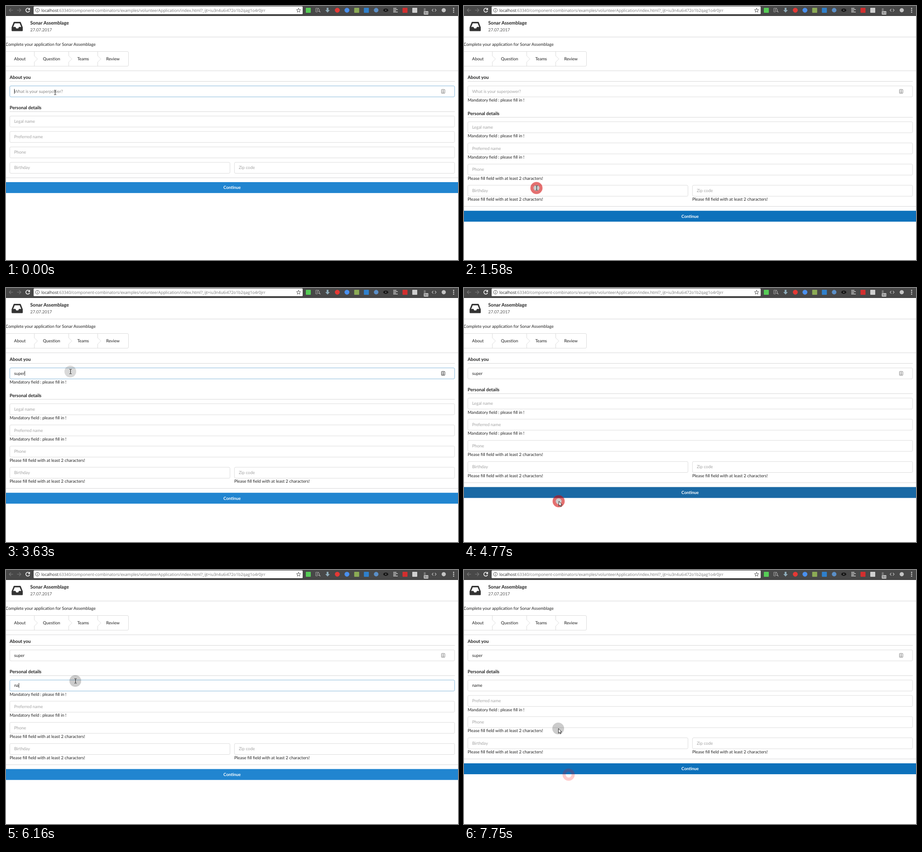
These frames come from a looping animation (998x561 px, 7990 ms). An HTML page:

```html
<!DOCTYPE html>
<html lang="en">
<head>
<meta charset="utf-8">
<title>Volunteer application</title>
<style>
  html, body { margin: 0; width: 100%; height: 100%; overflow: hidden; background: #fff; }
  svg { display: block; width: 998px; height: 561px; }
  text { font-family: Lato, sans-serif; text-rendering: geometricPrecision; white-space: pre; }
  .url { font-family: "Open Sans", sans-serif; }
</style>
</head>
<body>
<svg viewBox="0 0 998 561"><g id="chrome"></g><g id="form"></g><g id="pointer"></g></svg>
<script>
const LOOP = 7990, ERROR_HEIGHT = 12.65, FIELD_HEIGHT = 24.6;
const INK = '#212121', LINE = '#dcdcdc';
const EVENT = 'Sonar Assemblage';
const MANDATORY = 'Mandatory field : please fill in !';
const TOO_SHORT = 'Please fill field with at least 2 characters!';

const TICKS = [0, 190, 480, 690, 910, 1120, 1580, 1810, 2040, 2270, 2490, 2720, 2950, 3180, 3630,
  4110, 4340, 4570, 4770, 5010, 5240, 5470, 5700, 5930, 6160, 6400, 6630, 6860, 7090, 7310, 7540, 7750];

// Mouse path: time, x, y
const PATH = [[0, 108, 191], [190, 109, 188], [480, 118, 225], [1120, 160, 402], [1580, 160, 402],
  [1810, 158, 388], [2270, 144, 200], [2490, 142, 184.5], [3630, 142, 184.5], [4110, 150, 215],
  [4340, 188, 400], [4570, 207, 478], [4770, 209, 471], [5010, 199, 400], [5240, 168, 290],
  [5470, 152, 254], [5700, 153, 245], [6630, 153, 245], [6860, 240, 281], [7090, 236, 390],
  [7310, 228, 449], [7540, 231, 452], [7750, 208, 350]];

// Focus and typing: time, field, value
const EDITS = [[-350, 0, ''], [2490, 0, ''], [2950, 0, 's'], [3180, 0, 'sup'], [3630, 0, 'super'],
  [5700, 1, ''], [6160, 1, 'na'], [6400, 1, 'nam'], [6630, 1, 'name']];

const SUBMITS = [1400, 4770, 7540];
const CLICKS = [1400, 2490, 4770, 5700, 7540];

const FIELDS = [
  { label: 'What is your superpower?', error: MANDATORY, fixedAt: 4770 },
  { label: 'Legal name', error: MANDATORY, fixedAt: 7540 },
  { label: 'Preferred name', error: MANDATORY },
  { label: 'Phone', error: TOO_SHORT },
  { label: 'Birthday', error: TOO_SHORT, right: 494.5 },
  { label: 'Zip code', error: TOO_SHORT, left: 504.4 },
];

const layer = id => document.getElementById(id);
const text = (x, y, s, { size = 9.4, fill = INK, extra = '' } = {}) =>
  `<text x="${x}" y="${y}" font-size="${size}" fill="${fill}" ${extra}>${s}</text>`;
const bold = (x, y, s, size, fill, extra = '') =>
  text(x, y, s, { size, fill, extra: 'font-weight="700" ' + extra });
const rect = (x, y, w, h, fill, extra = '') =>
  `<rect x="${x}" y="${y}" width="${w}" height="${h}" fill="${fill}" ${extra}/>`;
const circle = (x, y, r, fill, extra = '') =>
  `<circle cx="${x}" cy="${y}" r="${r}" fill="${fill}" ${extra}/>`;
const stroke = (d, color, width = 1, extra = '') =>
  `<path d="${d}" fill="none" stroke="${color}" stroke-width="${width}" ${extra}/>`;
const rule = (y, x = 0, right = 998, color = '#d6d6d7') => stroke(`M${x} ${y}H${right}`, color);

function browserBar() {
  const badge = (x, color) => rect(x - 5.5, 4, 11, 11, color, 'rx="1"');
  return rect(0, 0, 998, 22, '#484848') + rect(0, 20.5, 998, 1.5, '#3b3b3b')
    + rect(61, 1, 594, 17, '#fff', 'rx="1.5"')
    + stroke('M15.5 9.3H7M11 5.3L7 9.3L11 13.3', '#757575', 1.3)
    + stroke('M24.5 9.3H33M29 5.3L33 9.3L29 13.3', '#757575', 1.3)
    + stroke('M51.5 6.6A4.3 4.3 0 1 0 52.2 10.5M52.3 4.6V7.9H48.8', '#fff', 1.5)
    + circle(69.3, 9.3, 4.2, 'none', 'stroke="#555"') + stroke('M69.3 8.8V11.8M69.3 6.6V7.7', '#555', 1.1)
    + text(78, 12.6, '<tspan fill="#222">localhost</tspan>:63340/component-combinators/examples/'
      + 'volunteerApplication/index.html?_ijt=iu3n4u6i472o1b2qag1o4r0jrr',
      { size: 8.93, fill: '#757575', extra: 'class="url"' })
    + stroke('M646 4.9L647.3 8L650.6 8.2L648.1 10.4L648.9 13.7L646 11.9L643.1 13.7L643.9 10.4L641.4 8.2L644.7 8Z', '#555')
    + badge(667.5, '#56cc56')
    + stroke('M684 5V13H688M684 5H691', '#aaa') + circle(689.5, 9, 2.6, 'none', 'stroke="#bbb"')
    + stroke('M691.4 11L694 13.8', '#bbb', 1.4)
    + `<path d="M708 4H712V9H715L710 14.5L705 9H708Z" fill="#8eabb9"/>`
    + circle(731.5, 9.3, 5.4, '#e53935') + circle(752.8, 9.3, 5.4, '#4a90ee')
    + badge(774.3, '#8cab55') + badge(795.7, '#2f80cc') + circle(817.3, 9.3, 5, '#5b8fc7')
    + `<ellipse cx="838.5" cy="9.3" rx="5.6" ry="3.6" fill="#161616"/>` + circle(838.5, 9.3, 1.2, '#777')
    + stroke('M855 5.2H862M855 7.9H865M855 10.6H861M855 13.3H865', '#e2e2e2', 1.2)
    + badge(881, '#d32f2f') + badge(902.5, '#cfcfcf')
    + rect(922.5, 5, 4, 6, '#777') + rect(922.5, 11.5, 10, 7.5, '#c9c9c9', 'rx="1"')
    + text(924, 17.4, '8m', { size: 5.5 })
    + stroke('M943.5 6.3L940.7 9.3L943.5 12.3M947 6.3L949.8 9.3L947 12.3', '#ccc', 1.1)
    + circle(966.5, 9.3, 4.6, '#c4c4c4')
    + [5.2, 9.3, 13.4].map(y => circle(988.3, y, 1.2, '#e8e8e8')).join('');
}

function pageTop() {
  const separators = [62.5, 138.5, 202.5]
    .map(x => stroke(`M${x} 100.5V110L${x + 7} 117L${x} 124V133`, LINE)).join('');
  return `<path fill="#333" fill-rule="evenodd" d="M12.4 47L16.8 36Q17.2 35 18.3 35H31.2Q32.2 35 32.7 36L37 47V54
      Q37 55.5 35.5 55.5H14Q12.4 55.5 12.4 54ZM15.9 46.3H21L22.6 49.5H27L28.6 46.3H33.6L30.2 38.3H19.3Z"/>`
    + bold(53.6, 41.3, EVENT, 10.55, INK) + text(53.6, 56, '27.07.2017', { fill: '#555' })
    + rule(68.5) + text(-1, 88.2, 'Complete your application for ' + EVENT)
    + rect(-4, 100.5, 274.5, 32.5, '#fff', `rx="2.6" stroke="${LINE}"`) + separators
    + text(17.8, 120.2, 'About') + text(81.6, 120.2, 'Question')
    + text(157.4, 120.2, 'Teams') + text(221.2, 120.2, 'Review')
    + rule(143) + bold(8, 161.4, 'About you', 10.05, INK) + rule(166.5, 8, 991);
}

const latest = (list, t) => list.filter(v => v <= t).pop() ?? -Infinity;

function mouseAt(t) {
  const next = PATH.findIndex(p => p[0] > t);
  if (next < 0) return PATH[PATH.length - 1].slice(1);
  const [a, b] = [PATH[next - 1], PATH[next]];
  const k = (t - a[0]) / (b[0] - a[0]);
  return [a[1] + (b[1] - a[1]) * k, a[2] + (b[2] - a[2]) * k];
}

// Places every field, its error line and the button for time t
function layout(t) {
  const failed = t >= SUBMITS[0];
  let shift = 0;
  const boxes = FIELDS.map((field, i) => {
    const row = Math.min(i, 4);
    const hasError = failed && t < (field.fixedAt ?? Infinity);
    const top = (row ? 242.9 + (row - 1) * 34.1 : 176.4) + shift;
    if (hasError && i !== 4) shift += ERROR_HEIGHT;
    return { left: 8.4, right: 990.6, ...field, top, hasError };
  });
  return { boxes, shift, personalShift: boxes[0].hasError ? ERROR_HEIGHT : 0, buttonTop: 389 + shift };
}

function fieldSvg(box, value, focused, t) {
  const { left, right, top, label, error, hasError } = box;
  const baseline = top + 15.2;
  const placeholder = focused ? '#858585' : '#a2a2a2';
  return rect(left, top + .1, right - left, FIELD_HEIGHT - .3, '#fff',
      `rx="2.6" stroke="${focused ? '#85b7d9' : LINE}"`)
    + text(left + 9.5, baseline, value || label,
      { fill: value ? INK : placeholder, extra: focused ? 'id="focused"' : '' })
    + (hasError ? text(left - .4, top + 34.6, error) : '');
}

function fillIcon(dark) {
  const color = dark ? '#222' : '#777';
  return rect(961.5, 184.3, 7.4, 8.6, 'none', `rx="1" stroke="${color}"`)
    + circle(965.2, 187.2, 1.1, color) + stroke('M965.2 188.5V190.6M963.4 190.8H967', color, 1.1);
}

function cursorSvg(kind, x, y) {
  const shapes = {
    beam: stroke('M-2.5 -5H-.6L0 -4.4L.6 -5H2.5M0 -4.4V4.4M-2.5 5H-.6L0 4.4L.6 5H2.5', '#222'),
    arrow: '<path d="M0 0V10.6L2.5 8.4L4.2 12L5.8 11.2L4.2 7.8H7.3Z" fill="#fff" stroke="#111" stroke-width=".9"/>',
    hand: `<path d="M.2 1Q1.2 -.2 2.1 1V5.2L6 6Q7.3 6.4 7.2 7.8L6.3 13.4H.3L-2.8 8.6Q-2.6 7.2 -1.2 7.8L.2 9Z"
      fill="#fff" stroke="#111" stroke-width=".9"/>`,
  };
  return `<g transform="translate(${x} ${y})">${shapes[kind]}</g>`;
}

function render(t) {
  const { boxes, personalShift, shift, buttonTop } = layout(t);
  const [x, y] = mouseAt(t);
  const submitted = latest(SUBMITS, t);
  const edits = EDITS.filter(e => e[0] <= t);
  const [editedAt, editedField] = edits[edits.length - 1];
  const focus = editedAt > submitted ? editedField : -1;
  const values = [];
  edits.forEach(([, field, value]) => values[field] = value);

  const overButton = y >= buttonTop && y <= buttonTop + 24;
  const overField = boxes.some(b => y >= b.top && y <= b.top + FIELD_HEIGHT && x >= b.left && x <= b.right);
  let buttonColor = '#2185d0';
  if (focus < 0) buttonColor = t - submitted < 100 ? '#1a69a4' : '#0d71bb';
  else if (overButton && submitted > 0) buttonColor = '#1678c2';

  layer('form').innerHTML =
    bold(8, 227.9 + personalShift, 'Personal details', 10.05, INK)
    + rule(233.3 + personalShift, 8, 991)
    + boxes.map((box, i) => fieldSvg(box, values[i], i === focus, t)).join('')
    + fillIcon(focus === 0 && values[0])
    + rule(379.4 + shift)
    + rect(0, buttonTop, 998, 24.1, buttonColor)
    + bold(499.2, buttonTop + 15.3, 'Continue', 9.4, '#fff', 'text-anchor="middle"');

  if (focus >= 0 && Math.floor((t - editedAt) / 530) % 2 === 0) {
    const { left, top } = boxes[focus];
    const width = values[focus] ? layer('focused').getComputedTextLength() : 0;
    layer('form').innerHTML += rect(left + 9.7 + width, top + 6.8, .9, 10.6, '#111');
  }

  const clickedAt = latest(CLICKS, t), age = t - clickedAt;
  const ringAlpha = age < 200 ? .45 : age < 450 ? .2 : 0;
  const haloAlpha = t < 480 ? 0 : t >= 3630 && t < 4110 ? .15 : .2;
  const [ringX, ringY] = mouseAt(Math.max(clickedAt, 0));
  layer('pointer').innerHTML =
    circle(x, y, 13, '#000', `opacity="${haloAlpha}"`)
    + circle(ringX, ringY, 10, 'none', `stroke="#f00" stroke-width="7" opacity="${ringAlpha}"`)
    + cursorSvg(overButton ? 'hand' : overField ? 'beam' : 'arrow', x + .5, y);
}

layer('chrome').innerHTML = browserBar() + pageTop();
let shown;
function loop() {
  const tick = latest(TICKS, performance.now() % LOOP);
  if (tick !== shown) render(shown = tick);
  requestAnimationFrame(loop);
}
loop();
</script>
</body>
</html>
```
